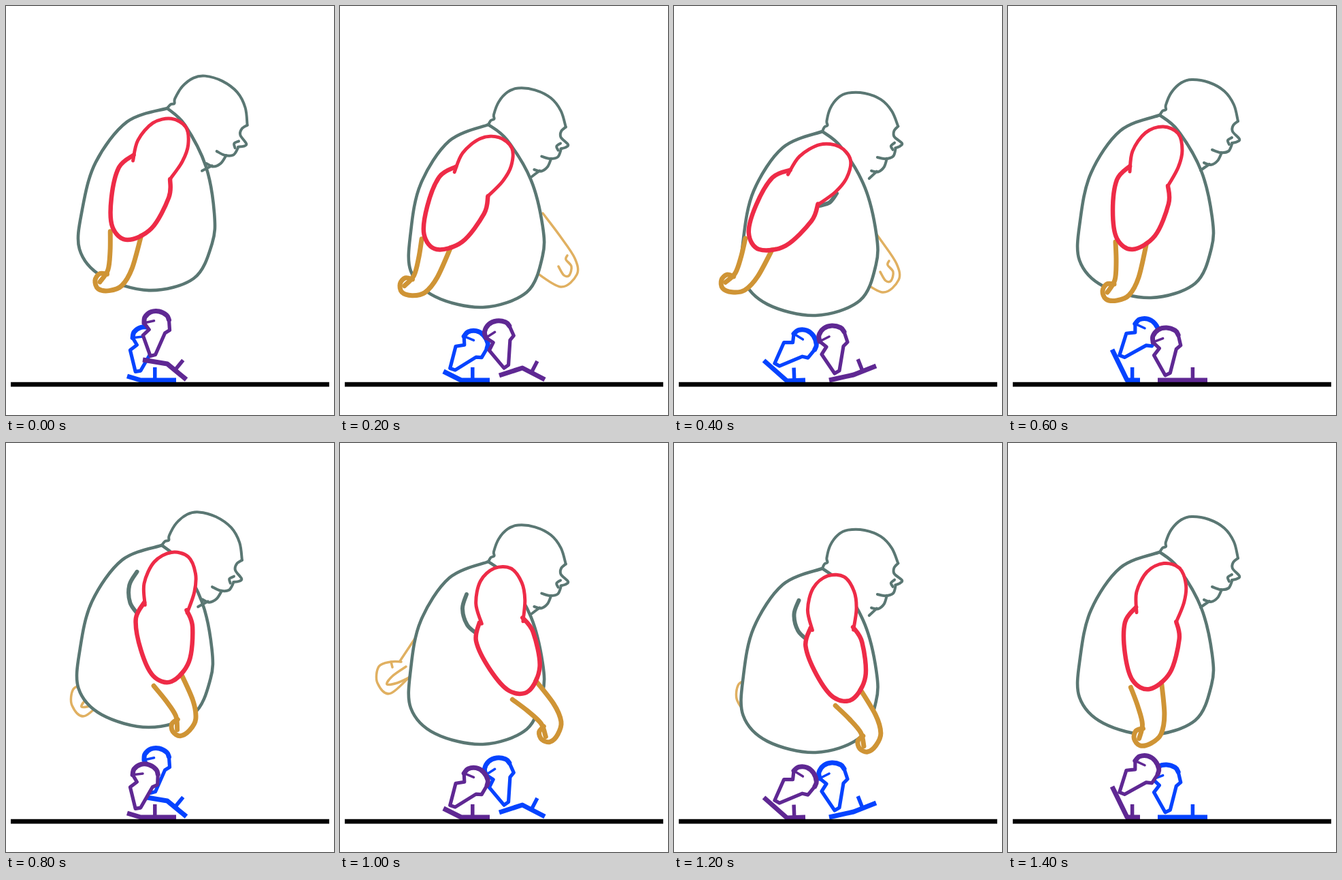
These frames come from a looping animation (482x600 px, 1.6 s). An HTML page:

```html
<!DOCTYPE html>
<html lang="en">
<head>
<meta charset="utf-8">
<title>Heavy walk</title>
<style>
  html, body { margin: 0; width: 100%; height: 100%; overflow: hidden; background: #fff; }
  svg { display: block; width: 100%; height: 100%; }
  path { stroke-linejoin: round; }
</style>
</head>
<body>
<svg id="stage" viewBox="0 0 482 600"></svg>
<script>
const STEP = 200, COUNT = 8;
const SLATE = '#5a7773', RED = '#ee2b47', OCHRE = '#cf9435', PALE = '#e0b061';
const BLUE = '#0543ff', PURPLE = '#5f2893';

const points = s => s.trim().split(/\s+/).map(p => p.split(',').map(Number));
const part = (bone, lines) => ({ bone: points(bone), lines: lines.split('|').map(points) });

// Each part is drawn once around a bone; posing turns and scales it onto two joints.
const torso = part('223,160 208,428', '223,160 165,183 122,245 106,315 105,373 140,411 210,428 275,407 299,355 300,310 284,242 250,183 223,160');
const head = part('223,160 340,196', `223,160 227,154 232,152 232,145 240,127 254,113 270,108 295,112 318,125 332,145 338,169
  | 338,169 331,175 330,184 340,195 337,199 329,201 | 329,193 323,197 325,203
  | 300,211 312,215 324,213 329,203 | 314,215 308,227 298,233 288,230 | 296,232 283,241`);
const upper = part('225,177 207,252', '179,243 183,213 202,186 228,177 250,187 256,212 250,237 235,264');
const fore = part('207,252 183,357', '235,264 236,290 216,337 183,357 160,341 154,300 160,255 179,235');
const hand = part('183,357 148,418', '158,346 159,375 157,402 146,420 | 156,408 145,408 139,418 144,430 160,432 178,424 192,398 204,346');
const pits = {
  front: part('224,185 238,262', '186,222 180,243 187,267 203,281'),
  back: part('240,205 190,268', '214,293 229,288 239,275')
};
const shin = part('232,469 238,539', `214,492 213,483 220,473 232,469 245,472 250,478
  | 250,478 255,493 249,499 243,535 236,539 217,511 224,500 214,492 | 216,491 228,485`);
const farFront = part('305,345 306,420', '280,312 305,345 327,378 330,402 306,420 265,395 | 316,374 314,380 322,390 319,403 311,403 303,390');
const farBack = part('88,320 67,365', '130,257 88,320 | 90,321 75,321 57,328 55,352 75,367 118,326 | 75,321 77,329 | 97,328 77,342 69,354 84,352 104,343');

// Neck, base and nose; the second half stride repeats the first.
const torsos = [
  '237,150 208,417 353,203',
  '218,174 208,442 335,204',
  '218,184 206,454 335,202',
  '223,160 208,428 340,196',
  '229,150 208,417 346,200'
].map(points);

// Shoulder, elbow, wrist, fist.
const arms = [
  '240,165 214,239 178,343 140,403',
  '231,192 193,260 142,357 97,409',
  '240,205 190,268 125,357 78,404',
  '225,177 207,252 183,357 148,418',
  '240,161 235,242 243,350 252,418',
  '224,185 238,262 277,364 302,428',
  '223,196 233,273 262,376 279,442',
  '226,177 218,254 208,361 194,431'
].map(points);

// Knee, ankle, then heel, ball and toe; the other leg is half a stride behind.
const legs = [
  '210,472 192,537 178,543 198,549 250,549',
  '211,483 163,533 152,536 178,549 220,549',
  '205,484 149,526 132,520 166,550 193,549',
  '216,466 165,514 153,504 175,549 194,549',
  '225,448 214,514 201,519 237,525 265,548',
  '230,462 243,531 234,542 268,531 301,548',
  '232,469 238,539 228,549 264,541 297,528',
  '233,472 233,542 220,549 257,549 293,549'
].map(points);

// Far hand and its offset, and the armpit shadow, where they show.
const extras = {
  1: { far: farFront, at: [18, -8] },
  2: { far: farFront, at: [0, 0], pit: 'back' },
  4: { far: farBack, at: [42, 33], pit: 'front' },
  5: { far: farBack, at: [0, 0], pit: 'front' },
  6: { far: farBack, at: [38, 26], pit: 'front' }
};

function fit({ bone: [p, q], lines }, a, b) {
  const ux = q[0] - p[0], uy = q[1] - p[1], vx = b[0] - a[0], vy = b[1] - a[1];
  const n = ux * ux + uy * uy, c = (ux * vx + uy * vy) / n, s = (ux * vy - uy * vx) / n;
  return lines.map(k => k.map(([x, y]) => {
    x -= p[0]; y -= p[1];
    return [a[0] + c * x - s * y, a[1] + s * x + c * y];
  }));
}

const line = k => 'M' + k.map(p => p.join()).join('L');

// Smooth spline through the points.
function curve(k) {
  let d = 'M' + k[0].join();
  for (let i = 0; i < k.length - 1; i++) {
    const a = k[i - 1] || k[i], b = k[i], c = k[i + 1], e = k[i + 2] || c;
    const h = [0, 1].map(n => b[n] + (c[n] - a[n]) / 6);
    const g = [0, 1].map(n => c[n] - (e[n] - b[n]) / 6);
    d += 'C' + [h, g, c].join(' ');
  }
  return d;
}

const path = (d, color, width, fill = 'none', cap = 'round') =>
  `<path d="${d}" stroke="${color}" stroke-width="${width}" fill="${fill}" stroke-linecap="${cap}"/>`;
const strokes = (list, color, width) => list.map(k => path(curve(k), color, width)).join('');
const mask = list => path(line(list.flat()), 'none', 0, '#fff');

function drawArm([shoulder, elbow, wrist, fist]) {
  const h = fit(hand, wrist, fist), u = fit(upper, shoulder, elbow), f = fit(fore, elbow, wrist);
  return mask(h) + strokes(h, OCHRE, 7) + mask([...u, ...f]) + strokes(u, RED, 5) + strokes(f, RED, 6.5);
}

function drawLeg([knee, ankle, heel, ball, toe], color) {
  const [cap, calf, crease] = fit(shin, knee, ankle);
  const dx = toe[0] - ball[0], dy = toe[1] - ball[1], len = 19 / Math.hypot(dx, dy);
  const foot = [ball[0] + dx * 0.4, ball[1] + dy * 0.4];
  const spur = [foot[0] + dy * len, foot[1] - dx * len];
  return path(line([heel, ball, toe]), color, 7, 'none', 'butt') +
    path(line([foot, spur]), color, 5.5, 'none', 'butt') +
    mask([cap, calf]) + path(line(calf), color, 5.2) +
    path(curve(cap), color, 7) + path(line(crease), color, 3.5);
}

function drawPose(arm, i) {
  const [neck, base, nose] = torsos[i] || torsos[i - 4];
  const { far, at, pit } = extras[i] || {};
  const farAt = p => [p[0] + at[0], p[1] + at[1]];
  return '<g visibility="hidden">' +
    (far ? strokes(fit(far, ...far.bone.map(farAt)), PALE, 3.5) : '') +
    path(curve(fit(torso, neck, base)[0]), SLATE, 4.6, '#fff') +
    strokes(fit(head, neck, nose), SLATE, 4) +
    (pit ? strokes(fit(pits[pit], arm[0], arm[1]), SLATE, 6) : '') +
    drawArm(arm) +
    drawLeg(legs[i], BLUE) + drawLeg(legs[(i + 4) % COUNT], PURPLE) + '</g>';
}

const stage = document.getElementById('stage');
stage.innerHTML = arms.map(drawPose).join('') + path('M7,555.2H475', '#000', 6.8, 'none', 'butt');
const groups = [...stage.querySelectorAll('g')];
const start = performance.now();

function tick() {
  const n = Math.floor((performance.now() - start) / STEP) % COUNT;
  groups.forEach((g, i) => g.setAttribute('visibility', i === n ? 'visible' : 'hidden'));
  requestAnimationFrame(tick);
}
tick();
</script>
</body>
</html>
```
